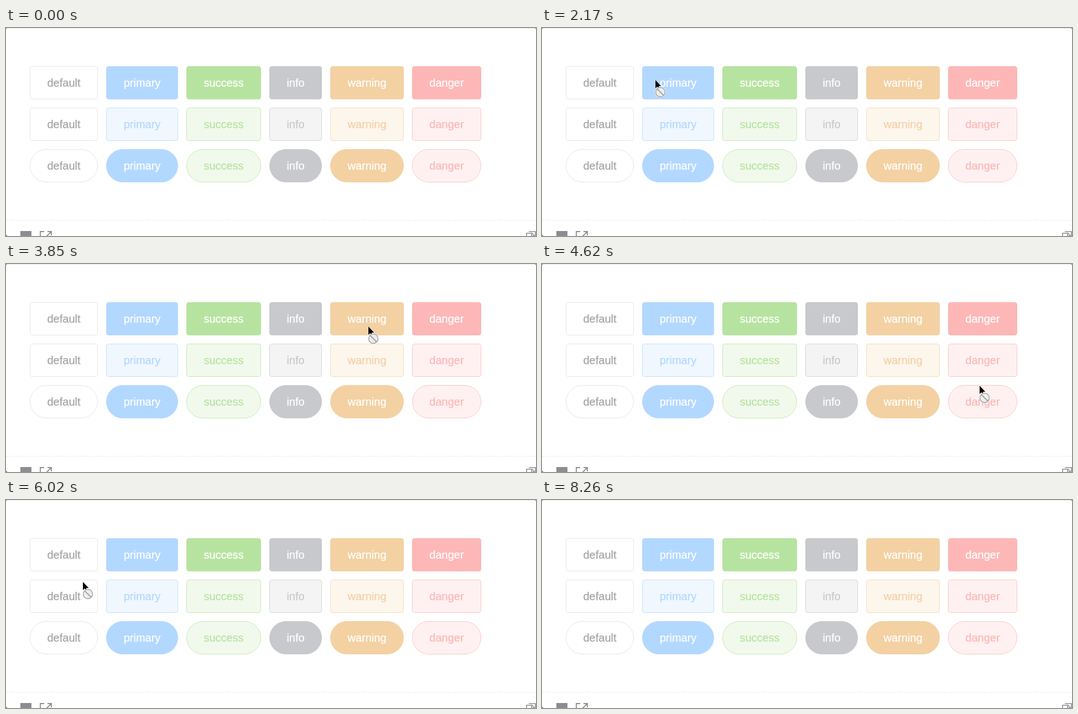
An HTML page that plays this animation: 958x376 px, repeating every 8330 ms.

```html
<!DOCTYPE html>
<html lang="en">
<head>
<meta charset="utf-8">
<title>Disabled buttons</title>
<style>
html, body { margin: 0; width: 100%; height: 100%; overflow: hidden; background: #fff; }
svg { display: block; width: 958px; height: 376px; }
text { font: 20px "Liberation Sans", Arial, sans-serif; text-anchor: middle; stroke-width: .25; }
</style>
</head>
<body>
<svg viewBox="0 0 958 376">
  <path d="M0 .5H958" stroke="#e9e9e9"/>
  <path d="M0 0H2L0 2ZM958 0H956L958 2Z" fill="#777"/>
  <path d="M0 347.5H958" stroke="#ebebeb" stroke-dasharray="4 2"/>
  <g id="buttons"></g>
  <rect y="374" width="2" height="2" fill="#8c8c92"/>
  <rect x="26" y="367" width="20" height="20" fill="#8c8c92"/>
  <g fill="none" stroke="#8c8c92" stroke-width="1.8">
    <path d="M69 368H62V380M75 368H82V375M82 368L72 378"/>
    <path d="M945 368H957V380M941 380V371H951L955 375V380M950 371V376H955" stroke-width="1.6"/>
  </g>
  <g id="cursor" visibility="hidden">
    <path d="M0 0V15L3.3 11.8L5.6 17L8 16L5.8 10.9H10.3Z" fill="#000" stroke="#fff" paint-order="stroke"/>
    <g id="badge" fill="none" stroke="#a0a0a0">
      <circle cx="9" cy="22" r="9.8" fill="#fff" stroke="none"/>
      <circle cx="9" cy="22" r="8.4" fill="#ededed" stroke-width="1.5"/>
      <path d="M3.4 16.4L14.6 27.6" stroke-width="2"/>
    </g>
  </g>
</svg>
<script>
const LOOP = 8330, STEP = 70;
const LEFT = 43, TOP = 69, HEIGHT = 60, GAP = 15, PADDING = 63, ROWS = 3;

// label, base colour, plain look in the last row
const KINDS = [
  ["default", [73, 74, 77], true],
  ["primary", [103, 177, 255], false],
  ["success", [111, 199, 67], true],
  ["info", [145, 147, 153], false],
  ["warning", [231, 163, 71], false],
  ["danger", [251, 111, 111], true]
];

// pointer rests: x, y, arrival, departure
const STOPS = [
  [400, 362, 210, 210], [345, 325, 490, 630], [13, 130, 840, 910],
  [93, 84, 1400, 1400], [182, 95, 1820, 2100], [390, 82, 2730, 3220],
  [630, 93, 3640, 3710], [791, 220, 4620, 4620], [438, 256, 5390, 5390],
  [139, 148, 5740, 6020], [635, 148, 6860, 6860], [770, 160, 7150, 7150],
  [467, 366, 7700, 7770]
];

const byId = id => document.getElementById(id);
const cursor = byId("cursor"), badge = byId("badge");
const boxes = [];

function add(tag, attrs) {
  const el = document.createElementNS("http://www.w3.org/2000/svg", tag);
  for (const key in attrs) el.setAttribute(key, attrs[key]);
  return byId("buttons").appendChild(el);
}

// base colour blended onto white
const tint = (base, part) =>
  `rgb(${base.map(c => Math.round(255 + (c - 255) * part))})`;

function drawButtons() {
  let left = LEFT;
  for (const [label, base, plainEnd] of KINDS) {
    const neutral = label === "default";
    const probe = add("text", {});
    probe.textContent = label;
    const textWidth = probe.getComputedTextLength();
    probe.remove();
    const x = Math.round(left), w = Math.round(textWidth + PADDING);

    for (let row = 0; row < ROWS; row++) {
      const y = TOP + row * (HEIGHT + GAP);
      const plain = neutral || row === 1 || (row === 2 && plainEnd);
      const fill = neutral ? "#fff" : tint(base, plain ? .1 : .5);
      const border = tint(base, neutral ? .14 : plain ? .4 : .5);
      const ink = plain ? tint(base, .5) : "#fff";
      add("rect", {
        x: x + .5, y: y + .5, width: w - 1, height: HEIGHT - 1,
        rx: row === 2 ? 29.5 : 4, fill, stroke: border
      });
      add("text", { x: x + w / 2, y: y + 37, fill: ink, stroke: ink }).textContent = label;
      boxes.push([x, y, w]);
    }
    left += textWidth + PADDING + GAP;
  }
}

function pointerAt(t) {
  const i = STOPS.findIndex(stop => t < stop[3]);
  if (i < 1) return null;
  const [fromX, fromY, , leave] = STOPS[i - 1];
  const [toX, toY, arrive] = STOPS[i];
  const k = Math.min(1, (t - leave) / (arrive - leave));
  return [fromX + (toX - fromX) * k, fromY + (toY - fromY) * k];
}

const overButton = (px, py) => boxes.some(([x, y, w]) =>
  px >= x && px < x + w && py >= y && py < y + HEIGHT);

function render(time) {
  const t = Math.floor((time % LOOP) / STEP) * STEP;
  const pos = pointerAt(t);
  cursor.setAttribute("visibility", pos ? "visible" : "hidden");
  if (!pos) return;
  const [x, y] = pos.map(Math.round);
  cursor.setAttribute("transform", `translate(${x} ${y})`);
  badge.setAttribute("display", overButton(x, y) ? "inline" : "none");
}

drawButtons();
const start = performance.now();
function tick() {
  render(performance.now() - start);
  requestAnimationFrame(tick);
}
tick();
</script>
</body>
</html>
```
